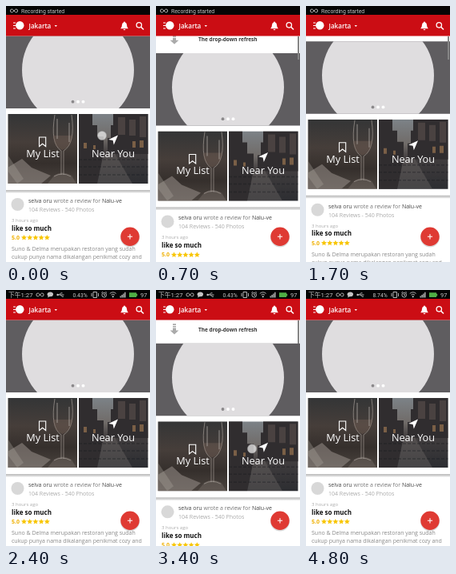
An HTML page that plays this animation: 180 px wide and 320 px high, repeating every 4850 ms.

```html
<!DOCTYPE html>
<html lang="en">
<head>
<meta charset="utf-8">
<title>Pull to refresh</title>
<style>
html, body { margin: 0; width: 100%; height: 100%; overflow: hidden; background: #fff; }
svg { display: block; width: 100vw; height: 100vh; }
text { font: 7px "Open Sans", "Noto Sans", sans-serif; white-space: pre; }
.bar text { font-family: Roboto, "Noto Sans CJK SC", "Noto Sans CJK", sans-serif; fill: #c4c4c4; }
.line { fill: none; stroke: #fff; stroke-width: 1.1; }
.bar .line { stroke: #c4c4c4; stroke-width: .9; }
.card { font-size: 12.7px; fill: #fff; text-anchor: middle; }
</style>
</head>
<body>
<svg viewBox="0 0 180 320">
  <defs>
    <linearGradient id="table" x1="0" y1="0" x2="0" y2="1">
      <stop offset="0" stop-color="#343536"/><stop offset=".4" stop-color="#463e3a"/>
      <stop offset=".7" stop-color="#352f2c"/><stop offset="1" stop-color="#4b443f"/>
    </linearGradient>
    <linearGradient id="street" x1="0" y1="0" x2="0" y2="1">
      <stop offset="0" stop-color="#7c8287"/><stop offset=".35" stop-color="#706b68"/>
      <stop offset=".55" stop-color="#413d3e"/><stop offset="1" stop-color="#2c2d31"/>
    </linearGradient>
    <linearGradient id="edge" x1="0" y1="0" x2="0" y2="1">
      <stop offset="0" stop-color="#b9b9b9"/><stop offset="1" stop-color="#e8e8e8"/>
    </linearGradient>
    <clipPath id="bannerClip"><path d="M0 37.5h180V128H0z"/></clipPath>
    <clipPath id="leftClip"><path d="M2.5 135h86.5v87H2.5z"/></clipPath>
    <clipPath id="rightClip"><path d="M91 135h86.5v87H91z"/></clipPath>
    <path id="loop" d="M0 0C-1.2-1.6-2-2-2.6-2A2 2 0 0 0-2.6 2C-2 2-1.2 1.6 0 0S2-2 2.6-2A2 2 0 0 1 2.6 2C2 2 1.2 1.6 0 0Z"/>
    <path id="star" d="M0-3.6 1-1.2 3.5-1 1.6.7 2.2 3.1 0 1.8-2.2 3.1-1.6.7-3.5-1-1-1.2Z"/>
  </defs>
  <rect width="180" height="320" fill="#fff"/>

  <g id="page">
    <path d="M21 13h4v1.6h-4zM21 15.6h4v1.6h-4zM21 18.2h4v3h3.4l-5.4 5-5.4-5h3.4z" fill="#aaa"/>
    <text x="53" y="23" style="font-size:6.5px;font-weight:700" fill="#333">The drop-down refresh</text>

    <g clip-path="url(#bannerClip)">
      <rect y="37" width="180" height="92" fill="#5f5d60"/>
      <circle cx="90" cy="80" r="70" fill="#dfdddf"/>
    </g>
    <circle cx="83.5" cy="119.7" r="1.9" fill="#8b898b"/>
    <circle cx="90" cy="119.7" r="1.9" fill="#fff"/>
    <circle cx="96.5" cy="119.7" r="1.9" fill="#fff"/>

    <g clip-path="url(#leftClip)">
      <rect x="2" y="135" width="88" height="88" fill="url(#table)"/>
      <path d="M2 202 20 191 32 202 56 212 44 222H2z" fill="#8f8882" opacity=".6"/>
      <path d="M2 186 22 216 14 222 2 206z" fill="#aaa39c" opacity=".35"/>
      <path d="M60 212Q70 205 82 212L88 222H52z" fill="#8a827a" opacity=".3"/>
      <path d="M61 136Q55 172 69 181V211M82 136Q87 172 72 181V211M60 213Q70 207 81 213" fill="none" stroke="#aaa29c" opacity=".65"/>
      <path d="M59 162H83Q81 177 70 180 60 176 59 162z" fill="#756358" opacity=".4"/>
      <path d="M64 141V166M79 146V170" stroke="#c4beb8" stroke-width="1.3" opacity=".5"/>
    </g>
    <path class="line" d="M41.5 164h8.2v11.5l-4.1-3.2-4.1 3.2z"/>
    <text class="card" x="46" y="189">My List</text>

    <g clip-path="url(#rightClip)">
      <rect x="91" y="135" width="87" height="88" fill="url(#street)"/>
      <path d="M91 135h17v14h6v14h8v21l-8 38H91zM178 135h-44v14h-3v16h-4v20h51z" fill="#302d2f"/>
      <path d="M140 139h9v22h-9zM154 142h8v20h-8zM167 138h8v26h-8z" fill="#4a4241"/>
      <path d="M97 171h4v7h-4zM109 174h3v5h-3zM158 169h4v8h-4zM167 168h5v9h-5z" fill="#9b7650" opacity=".7"/>
      <path d="M122 184h14l22 38h-44z" fill="#77716d" opacity=".35"/>
      <path d="M91 192h87M91 201h87M91 211h87" stroke="#17191e" stroke-width="1.6" stroke-dasharray="4 2" opacity=".35"/>
    </g>
    <path d="M140 161.5 134.8 173.5 133.6 168.1 128 167z" fill="#fff"/>
    <text class="card" x="134" y="189">Near You</text>

    <rect y="230" width="180" height="3.5" fill="url(#edge)"/>
    <circle cx="14.5" cy="248" r="8" fill="#d8d8d8"/>
    <text x="28" y="246" fill="#777"><tspan fill="#444">selva oru</tspan> wrote a review for <tspan fill="#444">Nalu-ve</tspan></text>
    <text x="28" y="257" fill="#aaa">104 Reviews - 540 Photos</text>
    <text x="7" y="270" fill="#aaa" style="font-size:6px">3 hours ago</text>
    <text x="7" y="280.5" fill="#111" style="font-size:8px;font-weight:700">like so much</text>
    <text x="7" y="292" fill="#efb000" style="font-size:7px;font-weight:700">5.0</text>
    <g id="stars" fill="#f8c500"></g>
    <text x="7" y="306.4" fill="#888">Suno &amp; Delma merupakan restoran yang sudah</text>
    <text x="7" y="316.2" fill="#888">cukup punya nama dikalangan penikmat cozy and</text>
  </g>

  <rect id="scrollbar" x="177" y="38" width="2" height="29" fill="#858585"/>

  <circle cx="155" cy="289.5" r="12" fill="#000" opacity=".15"/>
  <circle cx="155" cy="288.3" r="11.7" fill="#df3a33"/>
  <path d="M155 285.2v6.2M151.9 288.3h6.2" stroke="#fff" stroke-width="1.1"/>

  <rect y="11" width="180" height="26.5" fill="#cb0d14"/>
  <path d="M9 21h3M9 24.5h3M9 28h3" stroke="#fff" stroke-width="1.2"/>
  <circle cx="17.3" cy="24.3" r="5.2" fill="#fff"/>
  <text x="28.5" y="28" fill="#fff" style="font-size:8.1px;font-weight:600">Jakarta</text>
  <path d="M60.6 23.9h3.4l-1.7 2.1z" fill="#fff"/>
  <path d="M143.2 28.2Q145 26.8 145 23.4 145.2 21 147 20.4a1 1 0 0 1 2 0Q150.8 21 151 23.4 151 26.8 152.8 28.2zM146.7 29h2.6a1.3 1.3 0 0 1-2.6 0z" fill="#fff"/>
  <path d="M168.7 26.2 172 29.5" stroke="#fff" stroke-width="1.6"/>
  <circle class="line" cx="166.3" cy="23.8" r="3.2" style="stroke-width:1.3"/>

  <g class="bar">
    <rect width="180" height="11" fill="#050505"/>
    <g id="ticker">
      <use href="#loop" x="10" y="6" class="line"/>
      <text x="19" y="8.6" style="font-size:6.85px">Recording started</text>
    </g>
    <g id="status">
      <text x="3" y="8.7" style="font-size:7.8px">下午1:27</text>
      <use href="#loop" x="42.5" y="6" class="line"/>
      <path d="M51.5 5.4a3.8 2.9 0 1 1 3 2.8l-2.4 1.4.5-2.2q-1.1-.8-1.1-2z" fill="#c4c4c4"/>
      <path class="line" d="M64.5 6h8M66.5 6l2-2.2h2M68 6l2 2.2h2"/>
      <circle cx="64.6" cy="6" r="1.2" fill="#c4c4c4"/>
      <text id="percent" x="83.5" y="8.5" style="font-size:6.8px"></text>
      <path class="line" d="M109 2.5h4.5v7H109zM107 4v4M115.5 4v4"/>
      <circle class="line" cx="122.7" cy="6.2" r="2.8"/>
      <path class="line" d="M122.7 4.6v1.9h1.4M119.4 3.5l1.5-1.3M126 3.5l-1.5-1.3"/>
      <path class="line" d="M129.8 4.4q3.9-3.2 7.8 0M131.4 6.2q2.3-1.9 4.6 0"/>
      <circle cx="133.7" cy="8.3" r="1.1" fill="#c4c4c4"/>
      <path d="M142.5 9.5V7.6h1.3v1.9zM144.4 9.5V6h1.3v3.5zM146.3 9.5V4.4h1.3v5.1zM148.2 9.5V2.8h1.3v6.7z" fill="#c4c4c4"/>
      <path d="M154 3.2h9v1.5h1.2v2.8H163V9h-9z" fill="#4fae45"/>
      <text x="168" y="8.7" style="font-size:7.4px">97</text>
    </g>
  </g>
  <circle id="finger" r="5.6" fill="#eee" fill-opacity=".75" stroke="#999" stroke-opacity=".5"/>
</svg>

<script>
const LOOP = 4850, STEP = 50, BOUNCE = 400;
const el = id => document.getElementById(id);
const clamp = v => Math.min(1, Math.max(0, v));

// Each drag pulls the page by `reach` pixels, then lets it bounce back.
const drags = [
  { touch: 0, full: 650, release: 650, reach: 28, x: 120, y: 162 },
  { touch: 1050, full: 1450, release: 1500, reach: 27, x: 111, y: 162 },
  { touch: 2700, full: 3400, release: 3930, reach: 29.3, x: 120, y: 129 }
];

function show(node, opacity) { node.setAttribute("opacity", opacity); }
function shift(node, x, y) { node.setAttribute("transform", `translate(${x} ${y})`); }

el("stars").innerHTML = Array.from({ length: 5 }, (_, i) =>
  `<use href="#star" x="${22.5 + i * 7.2}" y="289.5"/>`).join("");

function draw(t) {
  const { touch, full, release, reach, x, y } = drags.findLast(drag => t >= drag.touch);
  const back = clamp((t - release) / BOUNCE);
  const pull = reach * clamp((t - touch) / (full - touch)) * (1 - back) ** 2;
  shift(el("page"), 0, pull);
  show(el("scrollbar"), clamp(pull / 3));

  shift(el("finger"), x, y + 2.37 * pull);
  show(el("finger"), t < release ? 1 : 0);

  const swap = clamp((t - 2100) / 300);
  shift(el("ticker"), 0, -11 * swap);
  show(el("ticker"), 1 - swap);
  shift(el("status"), 0, 4 * (1 - swap));
  show(el("status"), swap);
  el("percent").textContent = t < 3600 ? "0.43%" : "8.74%";
}

const start = performance.now();
function frame() {
  const t = (performance.now() - start) % LOOP;
  draw(t - t % STEP);
  requestAnimationFrame(frame);
}
frame();
</script>
</body>
</html>
```
